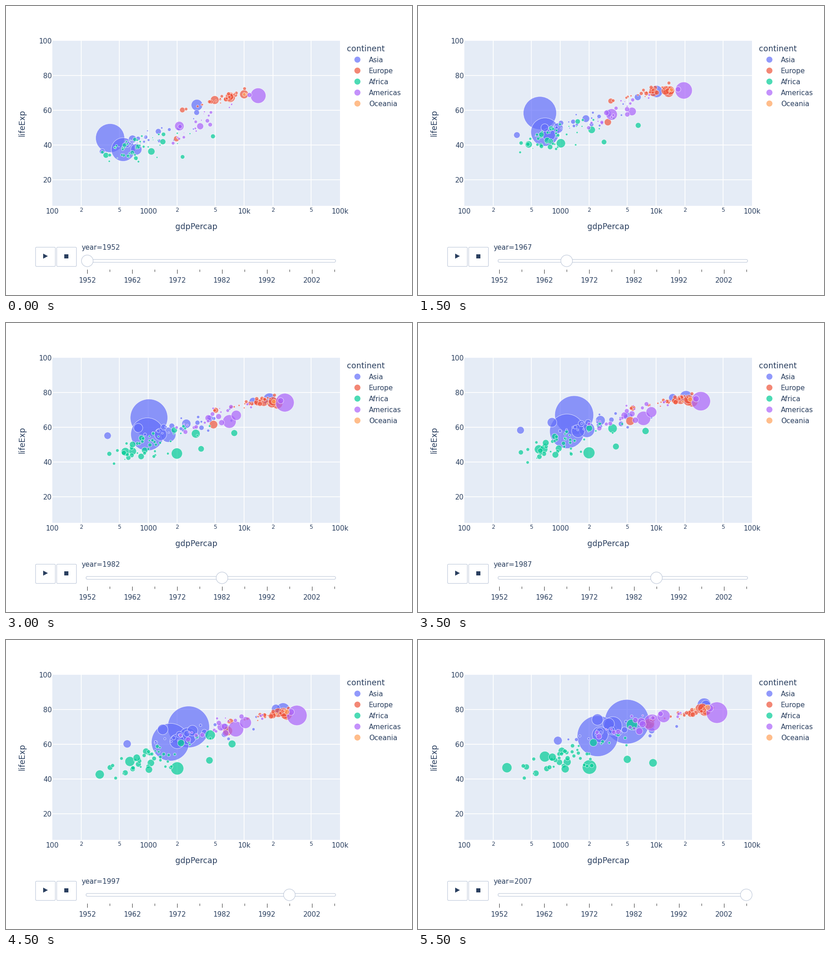
Animation of 885x632 px, one loop 6000 ms. Source, as a matplotlib script:

```python
import numpy as np
import matplotlib.pyplot as plt
from matplotlib.animation import FuncAnimation
from matplotlib.colors import to_rgba
from matplotlib.patches import Circle, FancyBboxPatch, Polygon, Rectangle

W, H, DPI = 885, 632, 100
PT = 72 / DPI  # points per pixel
INK, BORDER, PLOT_BG = "#2a3f5f", "#bec8d9", "#e5ecf6"
LEFT, RIGHT, TOP, BOTTOM = 101, 728.3, 76, 437
CONTINENTS = {"Asia": "#636efa", "Europe": "#ef553b", "Africa": "#00cc96",
              "Americas": "#ab63fa", "Oceania": "#ffa15a"}
YEARS = np.arange(1952, 2008, 5)
T = np.linspace(0, 1, len(YEARS))

plt.rcParams["font.family"] = "DejaVu Sans"
rng = np.random.default_rng(12)
bubbles = []  # (color, x per year, y per year, radius per year)


def px_x(gdp):
    return LEFT + 209.1 * (np.log10(gdp) - 2)


def px_y(life):
    return TOP + 3.8 * (100 - np.asarray(life))


def add(continent, log_gdp, life, pop_start, pop_end):
    """Store one bubble; its radius (area ~ millions of people) grows linearly."""
    start, end = 1.3355 * np.sqrt([pop_start, pop_end])
    bubbles.append((CONTINENTS[continent], px_x(10 ** log_gdp), px_y(life),
                    start + (end - start) * T))


def giant(continent, pops, *points, when=(1952, 1977, 2007)):
    """A large bubble led through a few (gdp, life) key points."""
    gdp, life = zip(*points)
    add(continent, np.interp(YEARS, when, np.log10(gdp)),
        np.interp(YEARS, when, life), *pops)


def swarm(continent, count, gdp, life, mode, spread, pop, growth, ease):
    """Smaller bubbles drifting along a band; richer ones live longer.

    gdp and life hold the band's (low, high) limits for the first and last year,
    mode is where along the band the bubbles crowd together.
    """
    (g0, g1), (l0, l1) = np.log10(gdp), np.array(life)
    rise = 1 - (1 - T) ** ease
    for _ in range(count):
        rank0 = rng.triangular(0, mode, 1)
        rank1 = np.clip(rank0 + rng.normal(0, 0.1), 0, 1)
        rank = rank0 + (rank1 - rank0) * T
        low, high = g0[0] + (g1[0] - g0[0]) * T, g0[1] + (g1[1] - g0[1]) * T
        wobble = 0.04 * np.sin(2 * np.pi * (T + rng.random())) * rng.random()
        log_gdp = low + (high - low) * rank + wobble
        low, high = l0[0] + (l1[0] - l0[0]) * rise, l0[1] + (l1[1] - l0[1]) * rise
        years = low + (high - low) * rank + rng.normal(0, spread)
        people = min(pop * np.exp(rng.normal(0, 0.9)), 4 * pop)
        add(continent, log_gdp, years, people, people * growth)


giant("Asia", (556, 1319), (400, 44), (576, 50.5), (488, 44.5), (613, 58.4), (741, 64),
      (4959, 73), when=(1952, 1957, 1962, 1967, 1977, 2007))
giant("Asia", (372, 1110), (547, 37.4), (813, 54.2), (2452, 64.7))
giant("Asia", (82, 223), (750, 37.5), (762, 46), (1383, 52.7), (3541, 70.6),
      when=(1952, 1967, 1977, 2007))
giant("Asia", (86, 127), (3217, 63), (14779, 73.4), (31656, 82.6), when=(1952, 1972, 2007))
giant("Asia", (41, 169), (685, 43.4), (1176, 54), (2606, 65.5))
giant("Asia", (26, 85), (605, 40.4), (821, 62.8), (2442, 74.2), when=(1952, 1987, 2007))
giant("Asia", (22, 91), (1273, 47.8), (2374, 60.1), (3190, 71.7))
giant("Asia", (20, 48), (331, 36.3), (385, 58.3), (944, 62.1), when=(1952, 1987, 2007))
swarm("Asia", 23, gdp=((500, 5500), (1300, 40000)), life=((37, 60), (61, 80)),
      mode=0.3, spread=3, pop=5, growth=3, ease=1.5)

giant("Europe", (69, 82), (7144, 67.5), (20513, 72.5), (32170, 79.4))
giant("Europe", (50, 61), (9980, 69.2), (17429, 72.8), (33203, 79.4))
giant("Europe", (48, 58), (4931, 65.9), (14256, 73.5), (28570, 80.5))
giant("Europe", (42, 61), (7030, 67.4), (18293, 73.8), (30470, 80.7))
giant("Europe", (22, 71), (1969, 43.6), (4269, 59.5), (8458, 71.8))
swarm("Europe", 25, gdp=((1700, 13000), (6500, 45000)), life=((57, 73), (72, 81.5)),
      mode=0.6, spread=0.9, pop=7, growth=1.2, ease=1.4)

giant("Africa", (33, 135), (1077, 36.3), (1015, 41), (1982, 44.5), (2014, 46.9),
      when=(1952, 1967, 1977, 2007))
giant("Africa", (22, 80), (1419, 41.9), (2785, 53.3), (5581, 71.3))
giant("Africa", (21, 76), (362, 34.1), (557, 44.5), (691, 52.9))
giant("Africa", (14, 65), (781, 39.1), (673, 47.4), (312, 42.6), (278, 46.5),
      when=(1952, 1987, 1997, 2007))
giant("Africa", (14, 44), (4725, 45), (8028, 55.5), (7479, 60.2), (9270, 49.3),
      when=(1952, 1977, 1997, 2007))
swarm("Africa", 46, gdp=((320, 3800), (430, 9500)), life=((34, 46), (45, 66)),
      mode=0.25, spread=3.5, pop=3, growth=3.3, ease=2)

giant("Americas", (158, 301), (13990, 68.4), (24073, 73.4), (42952, 78.2))
giant("Americas", (57, 190), (2109, 50.9), (3430, 57.6), (6660, 61.5), (9066, 72.4),
      when=(1952, 1967, 1977, 2007))
giant("Americas", (30, 109), (3478, 50.8), (7675, 65), (11978, 76.2))
giant("Americas", (12, 44), (2144, 50.6), (3816, 63.8), (7007, 72.9))
giant("Americas", (15, 33), (11367, 68.8), (22091, 74.2), (36319, 80.7))
swarm("Americas", 20, gdp=((1500, 7700), (2200, 17000)), life=((40, 65), (66, 78)),
      mode=0.45, spread=2.5, pop=3, growth=2.7, ease=1.5)

giant("Oceania", (8.7, 20.4), (10040, 69.1), (18334, 73.5), (34435, 81.2))
giant("Oceania", (2, 4.1), (10557, 69.4), (16234, 72.2), (25185, 80.2))

colors, xs, ys, radii = zip(*bubbles)
xs, ys, radii = map(np.array, (xs, ys, radii))

fig = plt.figure(figsize=(W / DPI, H / DPI), dpi=DPI, facecolor="white")
ax = fig.add_axes([0, 0, 1, 1])
ax.set(xlim=(0, W), ylim=(H, 0))
ax.axis("off")


def label(x, y, text, size=15, ha="center", **kw):
    return ax.text(x, y, text, fontsize=size * PT, color=INK, ha=ha, va="baseline", **kw)


def line(x, y, color, width, z):
    ax.plot(x, y, color=color, lw=width * PT, solid_capstyle="butt", zorder=z)


def rounded(x0, y0, x1, y1, radius):
    ax.add_patch(FancyBboxPatch((x0, y0), x1 - x0, y1 - y0, fc="white", ec=BORDER, lw=1.1 * PT,
                                boxstyle=f"round,pad=0,rounding_size={radius}"))


# Plot area, grid and axis labels
plot_area = Rectangle((LEFT, TOP), RIGHT - LEFT, BOTTOM - TOP, fc=PLOT_BG, lw=0, zorder=0)
ax.add_patch(plot_area)
for life in range(20, 101, 20):
    if life < 100:
        line([LEFT, RIGHT], [px_y(life)] * 2, "white", 1.76, 1)
    label(100, px_y(life) + 5.5, life, ha="right")
for power, name in enumerate(("100", "1000", "10k", "100k"), start=2):
    label(px_x(10 ** power), 454, name)
    for step in (1, 2, 5):
        x = px_x(step * 10 ** power)
        if LEFT < x < RIGHT - 1:
            line([x, x], [TOP, BOTTOM], "white", 1.76, 1)
            if step > 1:
                label(x, 450.5, step, 12)
label(415, 488, "gdpPercap", 17.3)
label(40, 256, "lifeExp", 17.3, rotation=90, rotation_mode="anchor")

# Legend
label(743, 99, "continent", 17.4, "left")
for i, (name, color) in enumerate(CONTINENTS.items()):
    ax.add_patch(Circle((766, 117.3 + 24 * i), 6.6, fc=color, lw=0, alpha=0.7))
    label(791, 123 + 24 * i, name, 15.1, "left")

# Buttons and slider
rounded(64.5, 527.5, 107.5, 569.5, 2)
rounded(110.5, 527.5, 153.5, 569.5, 2)
ax.add_patch(Polygon([(81, 541.5), (91.3, 547), (81, 552.5)], fc=INK, lw=0))
ax.add_patch(Rectangle((127, 543), 9, 8.5, fc=INK, lw=0))
rounded(174.5, 554.3, 718.5, 560.5, 3)
slider_x = 177.2 + 538.4 * T
for i, (x, year) in enumerate(zip(slider_x, YEARS)):
    major = i % 2 == 0
    line([x, x], [576, 585 if major else 581], "#333333", 1, 2)
    if major:
        label(x, 605, year)
year_label = label(164.5, 533, "", ha="left")
grip = Circle((slider_x[0], 557.3), 12.7, fc="white", ec=BORDER, lw=1.1 * PT, zorder=4)
ax.add_patch(grip)

dots = ax.scatter(xs[:, 0], ys[:, 0], s=1, c=[to_rgba(c, 0.7) for c in colors],
                  edgecolors=(1, 1, 1, 0.75), linewidths=0.9 * PT, zorder=3)
dots.set_clip_path(plot_area)


def update(i):
    dots.set_offsets(np.column_stack([xs[:, i], ys[:, i]]))
    dots.set_sizes((2 * radii[:, i] * PT) ** 2)
    grip.center = slider_x[i], 557.3
    year_label.set_text(f"year={YEARS[i]}")
    return dots, grip, year_label


anim = FuncAnimation(fig, update, frames=len(YEARS), interval=500, repeat=True)
plt.show()
```
